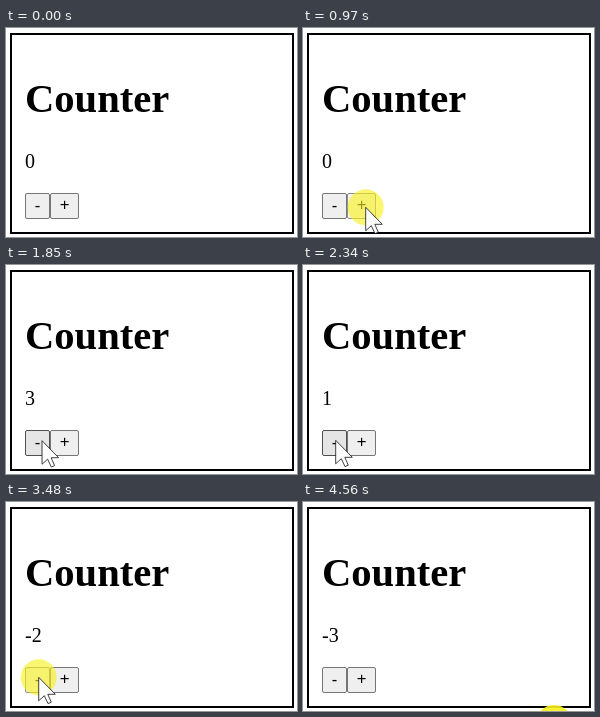
Recreate the animation shown at these times as an HTML page. Size 291x209 px, loop 4630 ms.

```html
<!DOCTYPE html>
<html lang="en">
<head>
<meta charset="utf-8">
<title>Counter</title>
<style>
  html, body { margin: 0; height: 100%; overflow: hidden; background: #fff; }
  svg { display: block; width: 100vw; height: 100vh; }
  .serif { font: 20px "Liberation Serif", serif; }
  .title { font-size: 40.6px; font-weight: bold; }
  .button rect { fill: #efefef; stroke: #767676; }
  .button.hover rect { fill: #e5e5e5; stroke: #4f4f4f; }
  .button.active rect { fill: #f5f5f5; stroke: #8d8d8d; }
  .button text { font: 16.67px "Liberation Sans", sans-serif; text-anchor: middle; }
</style>
</head>
<body>
<svg viewBox="0 0 291 209">
  <rect x="5" y="6" width="282" height="199" fill="#fff" stroke="#000" stroke-width="2"/>
  <text class="serif title" x="19" y="84">Counter</text>
  <text class="serif" id="count" x="19" y="139.5">0</text>
  <g class="button" id="minus">
    <rect x="19.5" y="165.5" width="24" height="25" rx="1.5"/>
    <text x="31.5" y="183.3">-</text>
  </g>
  <g class="button" id="plus">
    <rect x="44.5" y="165.5" width="28" height="25" rx="1.5"/>
    <text x="58.5" y="182">+</text>
  </g>
  <circle id="glow" r="18" fill="#f8f01c"/>
  <path id="cursor" d="M0 0V23.5L5.6 18.4L9.3 26.3L12.6 24.9L9.1 17H16.6Z" fill="#fff" stroke="#111" stroke-width="0.8"/>
</svg>
<script>
const LOOP = 4630, STEP = 70;
const easeOut = p => 1 - (1 - p) ** 2;
const linear = p => p;

// The pointer advances in discrete steps within each move.
const moves = [
  { start: 130, steps: 8, from: [147, 212], to: [73, 182.5], ease: easeOut },
  { start: 690, steps: 4, from: [73, 182.5], to: [62.7, 179.3], ease: easeOut },
  { start: 1780, steps: 3, from: [62.7, 179.3], to: [32.7, 175.3], ease: easeOut },
  { start: 3750, steps: 4, from: [32.7, 175.3], to: [335, 212], ease: linear },
];

// Each click: press time, count time, release time, change.
const clicks = [
  [970, 1040, 1170, 1], [1240, 1310, 1380, 1], [1640, 1710, 1710, 1],
  [1990, 2060, 2130, -1], [2210, 2280, 2340, -1], [2470, 2540, 2670, -1],
  [2740, 2810, 2810, -1], [3210, 3280, 3280, -1], [3480, 3550, 3550, -1],
];
const LAST_PRESS = 4560;

const $ = id => document.getElementById(id);
const [count, minus, plus, glow, cursor] = ["count", "minus", "plus", "glow", "cursor"].map($);

function pointerAt(t) {
  const move = moves.filter(m => m.start <= t).pop();
  if (!move) return [300, 230];
  const step = Math.floor((t - move.start) / STEP) + 1;
  const p = move.ease(Math.min(1, step / move.steps));
  return move.from.map((v, i) => v + (move.to[i] - v) * p);
}

function place(el, x, y) {
  el.setAttribute("transform", `translate(${x} ${y})`);
}

function setState(button, hover, pressed) {
  button.classList.toggle("hover", hover);
  button.classList.toggle("active", hover && pressed);
}

function draw(t) {
  const [x, y] = pointerAt(t);
  const pressed = clicks.some(([down, , up]) => t >= down && t < up);
  const leaving = t >= LAST_PRESS;
  const inRow = y >= 165 && y < 191;

  count.textContent = clicks.reduce((n, [, at, , change]) => n + (t >= at ? change : 0), 0);
  setState(minus, inRow && x >= 19 && x < 44, pressed);
  setState(plus, inRow && x >= 44 && x < 73, pressed);

  place(cursor, x, y);
  place(glow, ...(leaving ? [251, 221] : [x, y]));
  glow.setAttribute("opacity", leaving ? 0.9 : pressed ? 0.62 : 0);
}

const origin = performance.now();
function tick() {
  draw((performance.now() - origin) % LOOP);
  requestAnimationFrame(tick);
}
tick();
</script>
</body>
</html>
```
